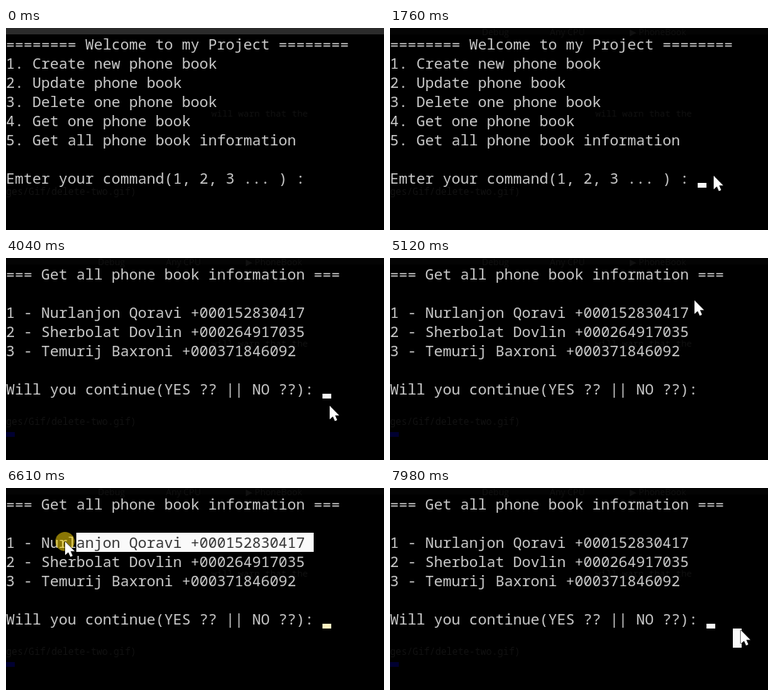
An HTML page with a canvas for the animation above (8000 ms loop, 473 by 253 pixels).

```html
<!DOCTYPE html>
<html lang="en">
<head>
<meta charset="utf-8">
<title>Phone book console</title>
<style>
html, body { margin: 0; width: 100%; height: 100%; overflow: hidden; background: #000; }
canvas { display: block; }
</style>
</head>
<body>
<canvas id="stage" width="473" height="253"></canvas>
<script>
const ctx = document.getElementById("stage").getContext("2d");
const W = 473, H = 253, LOOP = 8000;
const CELL_W = 11, CELL_H = 24, TOP = 8, COLS = 43;
const MONO = '"Noto Sans Mono", monospace';
const FONT = `500 ${CELL_W / 0.6}px ${MONO}`;

const MENU = [
  "======== Welcome to my Project ========",
  "1. Create new phone book",
  "2. Update phone book",
  "3. Delete one phone book",
  "4. Get one phone book",
  "5. Get all phone book information",
  "",
  "Emter your command(1, 2, 3 ... ) : "
];
const LIST = [
  "=== Get all phone book information ===",
  "",
  "1 - Nurlanjon Qoravi +000152830417",
  "2 - Sherbolat Dovlin +000264917035",
  "3 - Temurij Baxroni +000371846092",
  "",
  "Will you continue(YES ?? || NO ??): "
];

const FOCUS = 1630, TYPE = 3570, ENTER = 3770, SWITCH = 3970, READY = 4105;
const BLINK = 535, LAG = 70;

const ENTRY = { x: 434, y: 240 };
const MOVES = [
  { from: 660, to: 800, x: 407, y: 181 },
  { from: 1420, to: 1700, x: 405, y: 185 },
  { from: 4640, to: 5120, x: 381, y: 53 },
  { from: 5120, to: 5220, x: 386, y: 52 },
  { from: 5220, to: 5400, x: 360, y: 58 },
  { from: 5470, to: 5540, x: 386, y: 62 },
  { from: 5740, to: 5880, x: 375, y: 67 },
  { from: 5950, to: 6950, x: 13, y: 67 },
  { from: 7150, to: 7840, x: 439, y: 178 }
];
const PRESSES = [
  { down: 5220, up: 5470 },
  { down: 5950, up: 7150 },
  { down: 7840, up: 7970 }
];

const clamp = k => Math.min(1, Math.max(0, k));
const easeOut = k => 1 - (1 - k) ** 1.65;
const rowY = row => TOP + row * CELL_H;

function pointerAt(t) {
  let { x, y } = ENTRY;
  for (const move of MOVES) {
    const k = easeOut(clamp((t - move.from) / (move.to - move.from)));
    x += (move.x - x) * k;
    y += (move.y - y) * k;
  }
  return { x, y };
}

function cellAt(t) {
  const { x, y } = pointerAt(t);
  return Math.floor((y - TOP) / CELL_H) * COLS + Math.floor(x / CELL_W);
}

function screenAt(t) {
  if (t >= SWITCH) return LIST;
  const lines = MENU.slice();
  if (t >= TYPE) lines[lines.length - 1] += "5";
  if (t >= ENTER) lines.push("");
  return lines;
}

function drawLines(lines, color) {
  ctx.font = FONT;
  ctx.fillStyle = color;
  lines.forEach((line, row) => ctx.fillText(line, 0, rowY(row) + 19));
}

// Faint window seen through the translucent console
function drawBackdrop(t) {
  ctx.fillStyle = "#000";
  ctx.fillRect(0, 0, W, H);
  const fade = clamp((t - 1020) / 210);
  ctx.fillStyle = `rgba(255,255,255,${0.17 - 0.155 * fade})`;
  ctx.fillRect(0, 0, W, TOP);

  ctx.fillStyle = "#111";
  ctx.font = `11.2px ${MONO}`;
  ctx.fillText("will warn that the", 257, 111);
  ctx.font = `11.8px ${MONO}`;
  ctx.fillText("ges/Gif/delete-two.gif)", 0, 209);
  ctx.globalAlpha = fade;
  ctx.font = '11px "Open Sans", sans-serif';
  ctx.fillText("Debug", 115, 9);
  ctx.fillText("Any CPU", 200, 9);
  ctx.fillText("▶ PhoneBook", 300, 9);
  ctx.globalAlpha = 1;
  if (t >= SWITCH) {
    ctx.fillStyle = "#000030";
    ctx.fillRect(0, rowY(8) + 18, CELL_W, 6);
  }
}

function drawSelection(t, lines, press) {
  const anchor = cellAt(press.down);
  const head = cellAt(Math.max(press.down, Math.min(t, press.up) - LAG));
  const first = Math.min(anchor, head), last = Math.max(anchor, head);
  ctx.save();
  ctx.beginPath();
  for (let row = Math.floor(first / COLS); row <= Math.floor(last / COLS); row++) {
    const from = Math.max(first - row * COLS, 0);
    const to = Math.min(last + 1 - row * COLS, COLS);
    ctx.rect(from * CELL_W, rowY(row), (to - from) * CELL_W, CELL_H);
  }
  ctx.fillStyle = "#fafafa";
  ctx.fill();
  ctx.clip();
  drawLines(lines, "#333");
  ctx.restore();
}

// Blinking restarts on focus, on typing and on the last click
function drawCaret(t, lines, pressed) {
  const restarts = [FOCUS, TYPE, READY, PRESSES[2].down];
  const since = restarts.filter(time => time <= t).pop();
  if (since === undefined || Math.floor((t - since) / BLINK) % 2) return;
  const row = lines.length - 1;
  ctx.fillStyle = pressed ? "#fff4c0" : "#fafafa";
  ctx.fillRect(lines[row].length * CELL_W, rowY(row) + 18, CELL_W, 6);
}

function drawPointer({ x, y }, pressed) {
  if (pressed) {
    ctx.fillStyle = "rgba(250,215,10,.55)";
    ctx.beginPath();
    ctx.arc(x, y, 12, 0, Math.PI * 2);
    ctx.fill();
  }
  ctx.save();
  ctx.translate(Math.round(x), Math.round(y));
  const arrow = new Path2D("M0 0V17L4 13.4L6.6 19.2L9.4 18L6.9 12.3H12Z");
  ctx.strokeStyle = "#000";
  ctx.fillStyle = "#fff";
  ctx.stroke(arrow);
  ctx.fill(arrow);
  ctx.restore();
}

function draw(t) {
  const lines = screenAt(t);
  const press = PRESSES.filter(p => p.down <= t).pop();
  const pressed = Boolean(press) && t < press.up;

  drawBackdrop(t);
  drawLines(lines, "#ccc");
  if (press) drawSelection(t, lines, press);
  drawCaret(t, lines, pressed);
  if (t >= MOVES[0].from) drawPointer(pointerAt(t), pressed);
}

const start = performance.now();
function tick() {
  draw((performance.now() - start) % LOOP);
  requestAnimationFrame(tick);
}
tick();
</script>
</body>
</html>
```
